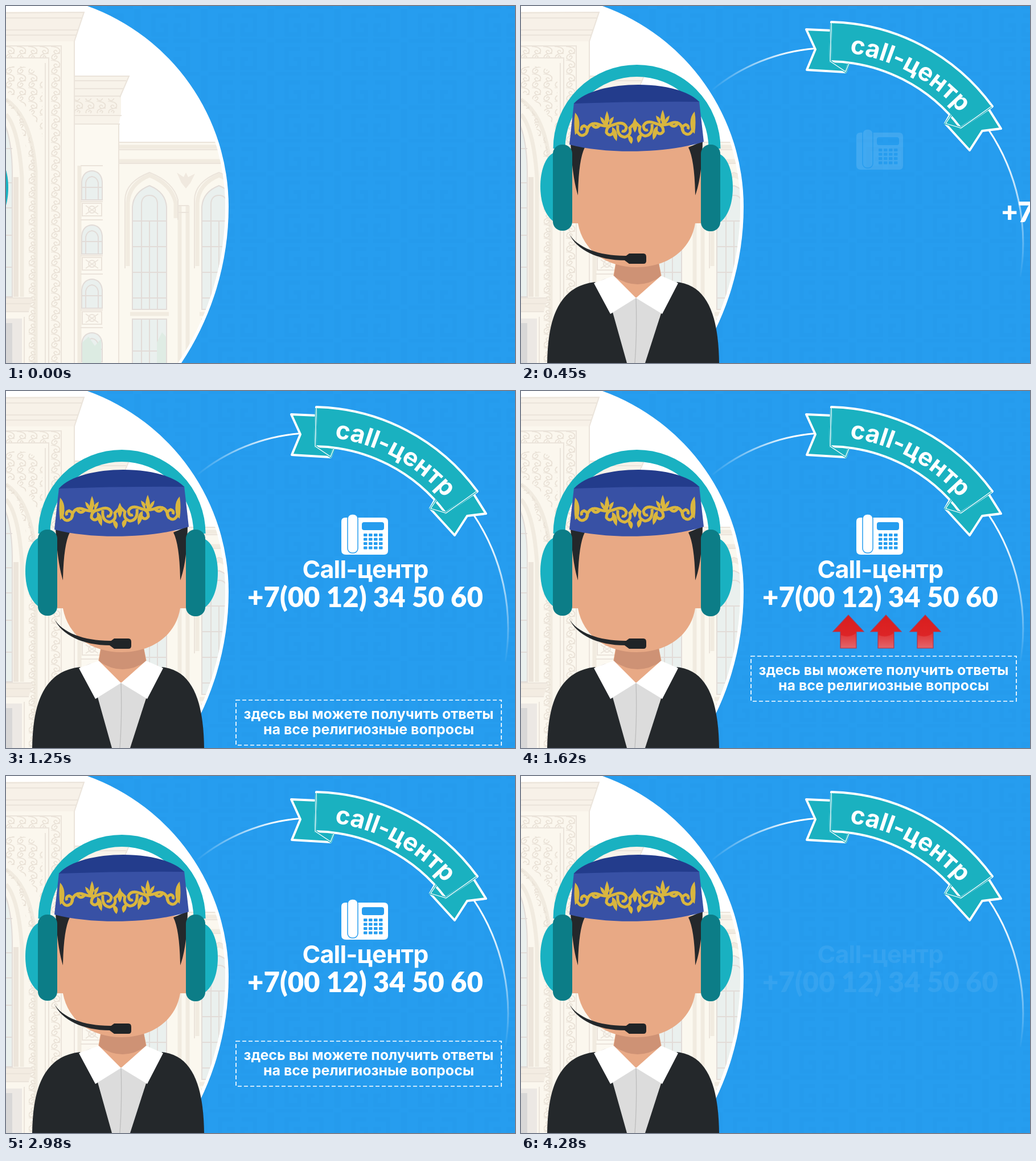
Animation of 894 by 626 pixels, one loop 4340 ms. Source, as an HTML page:

```html
<!DOCTYPE html>
<html lang="ru">
<head>
<meta charset="utf-8">
<title>Call-центр</title>
<style>
html, body { margin: 0; width: 100%; height: 100%; overflow: hidden; background: #269def; }
svg { display: block; width: 894px; height: 626px; }
text { font-family: Inter, "Open Sans", sans-serif; font-weight: 700; fill: #fff; }
.mid { text-anchor: middle; }
.line { fill: none; stroke: #ebe4db; stroke-width: 2; }
.soft { fill: none; stroke: #f1ebe0; stroke-width: 7; }
.glass { fill: #eaf0ee; stroke: #e2dcd8; stroke-width: 2; }
</style>
</head>
<body>
<svg viewBox="0 0 894 626">
  <defs>
    <pattern id="keys" width="117" height="117" x="348" y="5" patternUnits="userSpaceOnUse">
      <g id="keyRow" fill="none" stroke="#1f94e6" stroke-width="7" opacity=".3">
        <path id="key" d="M51 12H28V45H50V29H40M2 0V50M8 56H54"/>
        <use href="#key" transform="matrix(-1 0 0 1 117 0)"/>
      </g>
      <use href="#keyRow" y="58.5"/>
    </pattern>
    <pattern id="scroll" width="20" height="24" x="77" y="71" patternUnits="userSpaceOnUse">
      <path d="M2 0Q20 1 17 10Q10 16 7 9Q10 4 13 9M18 12Q0 13 4 22Q11 25 13 18Q9 14 8 19" fill="none" stroke="#e9e1d6" stroke-width="1.7"/>
    </pattern>
    <path id="dome" d="M0 0H143A374 374 0 0 1 391 352A494 494 0 0 1 308 626H0Z"/>
    <clipPath id="inset"><use href="#dome" x="-6"/></clipPath>
    <linearGradient id="fadeLeft" gradientUnits="userSpaceOnUse" x1="332" x2="480">
      <stop stop-color="#fff" stop-opacity="0"/><stop offset="1" stop-color="#fff"/>
    </linearGradient>
    <linearGradient id="fadeDown" gradientUnits="userSpaceOnUse" x1="0" x2="0" y1="250" y2="480">
      <stop stop-color="#fff"/><stop offset="1" stop-color="#fff" stop-opacity="0"/>
    </linearGradient>
    <linearGradient id="red" x1="0" x2="0" y1="0" y2="1">
      <stop stop-color="#d81e1e"/><stop offset=".6" stop-color="#dd2426"/><stop offset="1" stop-color="#e0545a"/>
    </linearGradient>
    <path id="ribbonLine" d="M577 82.600A308 308 0 0 1 845 388"/>
  </defs>

  <rect width="894" height="626" fill="#269def"/>
  <rect width="894" height="626" fill="url(#keys)"/>
  <use href="#dome" fill="#fff"/>

  <g id="building" clip-path="url(#inset)">
    <!-- right wing -->
    <path d="M190 238H400V626H190Z" fill="#fbf8ef"/>
    <path class="soft" d="M198 247H400M198 272H400"/>
    <path class="line" d="M198 239H400M198 252H400M198 276H400"/>
    <path d="M300 292L312 300L316 292L320 300L332 294L324 310L316 320L308 310Z" fill="#f0e9df"/>
    <g id="bay">
      <path class="soft" d="M214 456V345Q216 312 252 297Q290 312 298 345V372M305 350V626M319 350V626"/>
      <path class="line" d="M209 460V340Q210 308 252 292Q294 308 302 340V375M303 350H321M303 362H321"/>
      <path class="glass" d="M222 532V352Q224 326 252 315Q280 326 282 352V532ZM222 377H282M222 422H282M222 467H282M222 512H282M238 532V345Q240 332 252 332Q264 332 266 345V532M252 377V532"/>
      <path class="soft" d="M218 540H286"/>
      <path class="glass" d="M222 549H282V640H222ZM238 549V640M252 549V640M266 549V640M222 605H282"/>
      <path d="M265 626V590L274 572L281 580V626Z" fill="#dfece4"/>
    </g>
    <use href="#bay" x="122"/>
    <!-- stepped block -->
    <path d="M118 122H198V626H118Z" fill="#fcf9f1"/>
    <path d="M118 122H216L202 156V188L198 208H118Z" fill="#f8f3ea"/>
    <path class="line" d="M118 123H216L200 160M118 131H211M118 145H206M118 158H201M118 192H203M118 207H200M198 208V626"/>
    <path d="M118 162H199V188H118Z" fill="url(#scroll)"/>
    <path class="soft" d="M129 280V626"/>
    <g id="smallBay">
      <path class="glass" d="M133 340V308Q135 290 151 289Q167 290 169 308V340ZM140 340V310Q142 300 151 299Q160 300 162 310V340M133 318H169"/>
      <path class="line" d="M131 280H170M131 343H170M134 346H168V368H134ZM140 350L162 365M162 350L140 365M145 357A6 6 0 1 0 157 357A6 6 0 1 0 145 357"/>
    </g>
    <use href="#smallBay" y="95"/><use href="#smallBay" y="190"/><use href="#smallBay" y="284"/>
    <path d="M134 626V590L145 580L156 596L167 584V626Z" fill="#dcebe2"/>
    <!-- portal -->
    <path d="M0 10H120V626H0Z" fill="#fbf7ee"/>
    <path d="M0 11L137 12L120 62H0Z" fill="#f7f1e8"/>
    <path class="line" d="M0 12L137 11L120 62M0 21H133M0 42H126M0 51H123M0 70H97V626M0 91H75V626M69 100V626M120 62V626"/>
    <path d="M0 71H97V626H76V91H0Z" fill="url(#scroll)"/>
    <path d="M0 108Q46 98 64 130V230Q48 175 0 150Z" fill="url(#scroll)"/>
    <path class="soft" d="M0 164Q45 195 52 290V626M0 190Q22 215 28 300V510"/>
    <path d="M0 170Q34 200 40 290V626H52V290Q46 200 0 162Z" fill="url(#scroll)"/>
    <path class="glass" d="M-8 196Q10 225 11 290V510H-8ZM-8 250H11M-8 310H11M-8 354H11M-8 402H11M-8 458H11"/>
    <path d="M13 300H22V510H13Z" fill="#ece5db"/>
    <path d="M0 512H47L40 536H0Z" fill="#f3ece2"/>
    <path class="line" d="M0 512H47M0 522H44M0 536H40M32 545V626"/>
    <path d="M0 548H28V626H0Z" fill="#ece8e4"/><path d="M0 556H11V626H0Z" fill="#d8d7d7"/>
  </g>

  <g id="ribbon">
    <g fill="none" stroke-width="3">
      <path d="M336 147A329 329 0 0 1 516 74.500" stroke="url(#fadeLeft)"/>
      <path d="M820 215A358 358 0 0 1 877 475" stroke="url(#fadeDown)"/>
    </g>
    <g fill="#1ab1c0" stroke="#fff" stroke-width="4" stroke-linejoin="round">
      <path d="M546 43L501 41L517 76L502 112L570 116L576 100Z"/>
      <path d="M821 180L843 215L810 219L788 253L745 206L755 188Z"/>
      <path d="M545 28A360 360 0 0 1 828 176L772 214A291 291 0 0 0 543 97Z"/>
    </g>
    <path d="M545 30L543 97L570 115L576 101M826 176L773 214L746 206L756 191" fill="none" stroke="#1ab1c0" stroke-width="4"/>
    <path d="M545 30L543 97L570 115L576 101M826 176L773 214L746 206L756 191" fill="none" stroke="#fff" stroke-width="1.3"/>
    <text font-size="43.500"><textPath href="#ribbonLine">call-центр</textPath></text>
  </g>

  <g id="man">
    <path d="M67 250A136.500 136.500 0 0 1 340 250" fill="none" stroke="#19b1c1" stroke-width="21"/>
    <g fill="#19b1c1">
      <path id="cup" d="M340 260H350C364 268 372 292 372 318C372 346 364 368 350 379H340Z"/>
      <use href="#cup" transform="matrix(-1 0 0 1 406 -2)"/>
    </g>
    <path d="M168 440L162 475L202 513L247 475L240 440Z" fill="#e8a985"/>
    <path d="M168 446L163 474Q205 502 246 474L241 446Z" fill="#ce9275"/>
    <path d="M90 245H316V381H306C298 430 255 458 203 458C151 458 109 430 100 381H90Z" fill="#e8a985"/>
    <g fill="#24282b">
      <path d="M87 240L112 248Q101 270 100 332Q90 300 87 240Z"/>
      <path d="M319 237L294 248Q305 270 306 332Q318 300 319 237Z"/>
    </g>
    <g fill="#0c7d87">
      <rect x="56" y="243" width="34" height="151" rx="16"/><rect x="316" y="243" width="34" height="152" rx="16"/>
    </g>
    <path d="M93 170Q203 166 313 167L321 238C255 259 150 260 85 243Z" fill="#3851a5"/>
    <path d="M93 171C130 128 275 127 313 168Q203 167 93 171Z" fill="#233c8c"/>
    <g fill="#d9b63f" stroke="none">
      <g id="leaves">
        <path d="M95 187Q106 198 101 220L95 226Q92 206 95 187ZM151 184Q156 194 155 208L149 212Q144 202 151 184ZM139 194Q148 198 150 211Q140 206 139 194ZM163 194Q153 198 152 211Q162 207 163 194ZM160 212Q172 218 168 237Q158 228 160 212ZM188 226Q201 230 194 242Q187 236 188 226Z"/>
      </g>
      <use href="#leaves" transform="matrix(-1 0 0 1 400 -2)"/>
      <path d="M200 196Q192 210 200 222Q208 210 200 196Z"/>
    </g>
    <g fill="none" stroke="#d9b63f" stroke-width="5">
      <g id="scrolls">
        <path d="M98 218Q104 232 114 224Q121 214 111 210Q104 212 107 218M115 222Q119 202 135 207Q151 214 166 207Q180 202 185 212Q184 222 177 219M123 205Q130 218 138 209M160 209Q150 211 150 222Q156 230 162 222M170 209Q168 228 182 230Q195 226 191 214L200 205"/>
      </g>
      <use href="#scrolls" transform="matrix(-1 0 0 1 400 -2)"/>
    </g>
    <path d="M85 400C99 424 139 439 187 438V446C136 447 98 428 85 400Z" fill="#24282b"/>
    <path d="M182 440L190 434H215Q220 434 220 440V447Q220 452 215 452H190L182 446Z" fill="#202427"/>
    <path d="M157 530L202 511L248 530L219 626H186Z" fill="#dcdcdc"/>
    <path d="M202 512Q204 570 200 626" fill="none" stroke="#bdbdbd" stroke-width="1.300"/>
    <g fill="#24282b">
      <path d="M46 626C47 560 60 492 130 484L161 537L186 626Z"/>
      <path d="M348 626C347 560 335 490 274 484L246 539L218 626Z"/>
    </g>
    <g fill="#fff"><path d="M128 486L163 473L202 512L157 540Z"/><path d="M276 486L246 473L202 512L248 540Z"/></g>
  </g>

  <g id="phone">
    <path d="M603 222H664Q671 222 671 229V280Q671 287 664 287H597Q589 287 589 279V229Q589 222 596 222Z" fill="#fff"/>
    <rect x="600" y="216" width="18" height="68" rx="8" fill="#fff" stroke="#269def" stroke-width="1.500"/>
    <g fill="#269def"><rect x="625" y="230" width="39" height="14" rx="4"/><g id="buttons"></g></g>
  </g>
  <g id="callout">
    <text class="mid" x="631" y="328" font-size="43" letter-spacing="-.8">Call-центр</text>
    <text class="mid" x="631" y="379" font-size="49" style="font-family:Lato,sans-serif;font-weight:900">+7(00 12) 34 50 60</text>
  </g>
  <g id="note">
    <rect x="404" y="465" width="466" height="79" fill="none" stroke="#fff" stroke-width="1.700" stroke-dasharray="7 4"/>
    <text class="mid" x="637" y="498" font-size="25">здесь вы можете получить ответы</text>
    <text class="mid" x="637" y="525" font-size="25">на все религиозные вопросы</text>
  </g>
  <g id="arrows">
    <g id="arrow">
      <path d="M575 393L602 422H589V451H561V422H548Z" fill="url(#red)" stroke="#a93a55" stroke-width="1.200"/>
      <path d="M562 428Q576 434 588 425V450H562Z" fill="#fff" opacity=".1"/>
    </g>
    <use href="#arrow" x="66"/><use href="#arrow" x="135"/>
  </g>
</svg>
<script>
const LOOP = 4340;
const $ = id => document.getElementById(id);

let keypad = '';
for (let i = 0; i < 16; i++) {
  keypad += `<rect x="${628 + i % 4 * 9}" y="${250 + (i >> 2) * 7.5}" width="6.5" height="5" rx="1"/>`;
}
$('buttons').innerHTML = keypad;

// Each row is [time, value, number of steps towards the next row]; one step holds the value.
function track(id, prop, rows) {
  const frames = rows.map(([time, value, count = 1]) =>
    ({ offset: time / LOOP, [prop]: value, easing: `steps(${count}, end)` }));
  frames.push({ offset: 1, [prop]: rows[rows.length - 1][1] });
  $(id).animate(frames, { duration: LOOP, iterations: Infinity });
}
const move = (x, y) => `translate(${x}px, ${y}px)`;

track('man', 'transform', [[0, move(-368, 0), 13], [390, move(0, 0)]]);
track('ribbon', 'opacity', [[0, 0, 13], [390, 1]]);
track('phone', 'opacity', [[0, 0], [390, 0, 16], [870, 1], [3890, 1, 13], [4280, 0]]);
track('callout', 'transform', [[0, move(480, 0)], [390, move(480, 0), 16], [870, move(0, 0)]]);
track('callout', 'opacity', [[0, 1], [3890, 1, 13], [4280, 0.07]]);
track('note', 'transform', [[0, move(0, 165)], [1010, move(0, 165), 15], [1460, move(0, 0)]]);
track('note', 'opacity', [[0, 1], [3890, 1, 13], [4280, 0]]);

const blinks = [1560, 1590, 1620, 1920, 2050, 2450, 2580, 2980, 3180, 3580, 3650];
track('arrows', 'opacity', [
  [0, 0], ...blinks.map((time, i) => [time, (i + 1) % 2]), [3920, 1, 12], [4280, 0],
]);
</script>
</body>
</html>
```
